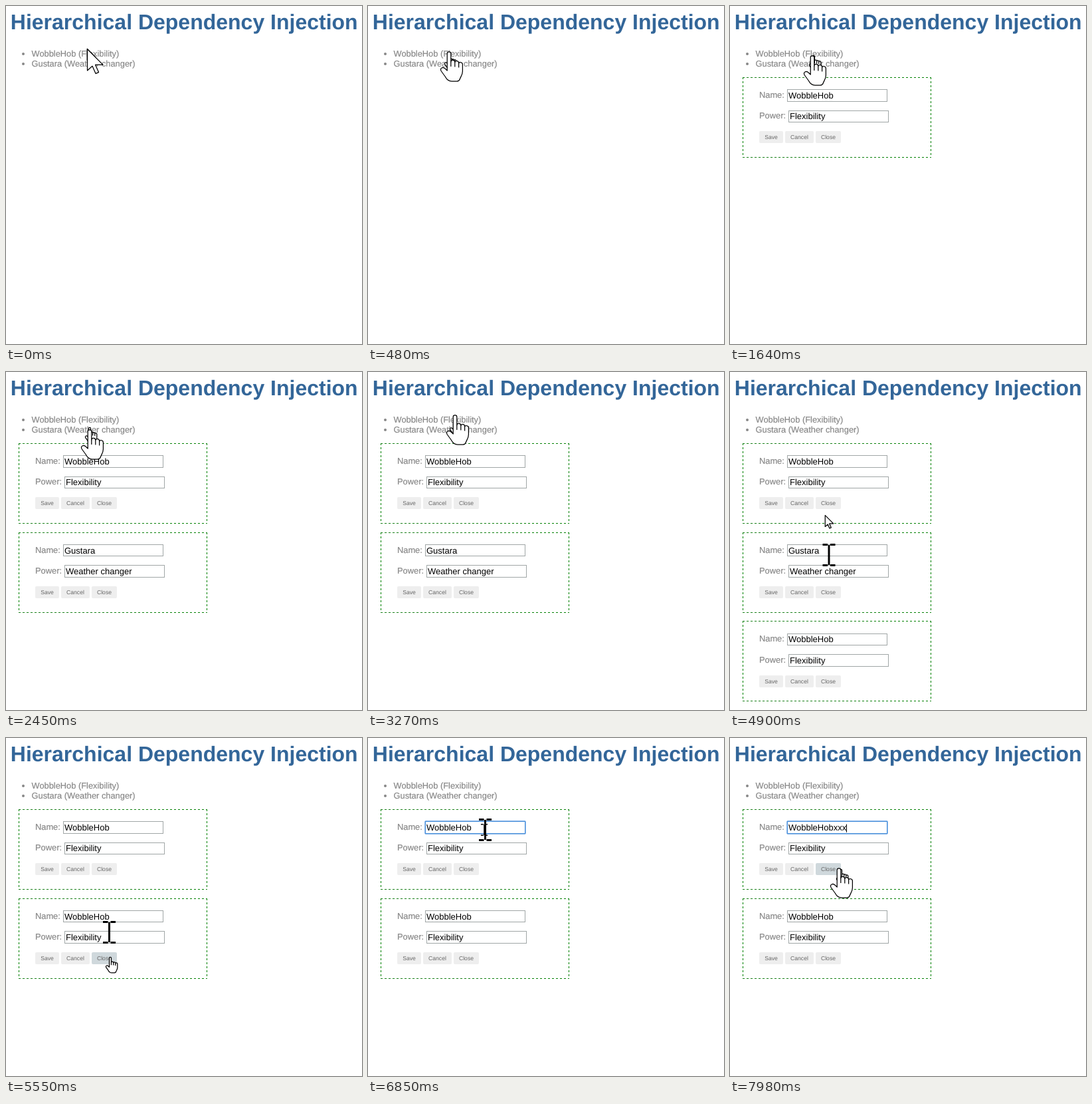
Recreate the animation shown at these times as an HTML page. Size 536x508 px, loop 8000 ms.

```html
<!DOCTYPE html>
<html lang="en">
<head>
<meta charset="utf-8">
<title>Hierarchical Dependency Injection</title>
<style>
html, body { margin: 0; width: 100%; height: 100%; overflow: hidden; background: #fff; }
svg { display: block; }
text {
  font: 12.85px "Liberation Sans", Arial, sans-serif; text-rendering: geometricPrecision;
  fill: #888; stroke: #888; stroke-width: .2px;
}
.title { font-size: 32px; font-weight: bold; fill: #369; stroke: none; }
.value { font-size: 13px; fill: #000; stroke: none; }
.label { font-size: 8.6px; fill: #666; stroke: none; text-anchor: middle; }
.box { fill: none; stroke: green; stroke-dasharray: 3 3; }
.field { fill: #fff; stroke: #a0a6a6; }
.focus { stroke: #4a90d9; }
.ring { fill: none; stroke: #8db9ec; }
.button { fill: #eee; }
.hover { fill: #cfd8dc; }
.outline { fill: #fff; stroke: #000; stroke-width: 1.25; stroke-linejoin: round; vector-effect: non-scaling-stroke; }
</style>
</head>
<body>
<svg width="536" height="508">
  <defs>
    <path id="arrow" class="outline" d="M.5 .8V33L8 26.3 13 37.6 17.5 35.6 12.6 24.4H24Z"/>
    <g id="hand">
      <path class="outline" d="M-2.8 29V3.5C-2.8 0 2.8 0 2.8 3.5V16C3 12.5 8.8 12.5 8.8 16.5C9.8 13.8 14.6 14 14.6 18C15.6 15.7 20.4 16.3 20.4 20V30C20.4 35 18 37.5 16.6 41C15.8 44 14 45 12 45H4C-.5 45-3.5 42.5-5.5 38.5L-12 29.5C-14 25-9 23-6 26Z"/>
      <path class="outline" d="M2.8 16V23M8.8 16.5V23.5M14.6 18V24.5"/>
    </g>
    <path id="beam" fill="none" stroke="#000" stroke-width="3"
      d="M-9.5-15.5H-2M2-15.5H9.5M0-15V15M-9.5 15.5H-2M2 15.5H9.5"/>
  </defs>
  <text class="title" x="6.8" y="35">Hierarchical Dependency Injection</text>
  <g fill="#888"><circle cx="26" cy="72" r="2"/><circle cx="26" cy="87" r="2"/></g>
  <text x="38.5" y="76">WobbleHob (Flexibility)</text>
  <text x="38.5" y="91">Gustara (Weather changer)</text>
  <g id="forms"></g>
  <g id="pointer"></g>
</svg>
<script>
const forms = document.getElementById('forms');
const pointer = document.getElementById('pointer');
const stretchy = ['WobbleHob', 'Flexibility'];
const stormy = ['Gustara', 'Weather changer'];
const pitch = 133.6;

// time, shape, x, y; an optional last pair places the small pointer
const path = [
  [0, 'arrow', 122, 64], [160, 'arrow', 122, 68], [320, 'hand', 122, 72], [480, 'hand', 122, 68],
  [1640, 'hand', 124, 74, 126, 74], [1800, 'hand', 125, 79], [1960, 'hand', 126, 83], [2120, 'hand', 126, 86],
  [2950, 'hand', 128, 80], [3110, 'hand', 130, 71], [3270, 'hand', 131, 64],
  [4260, 'hand', 131, 71], [4420, 'hand', 131, 98], [4580, 'arrow', 136, 150], [4740, 'arrow', 143, 215],
  [4900, 'beam', 149, 275], [5060, 'hand', 154, 318], [5220, 'hand', 157, 337],
  [5550, 'beam', 155.5, 292, 157, 329], [5710, 'arrow', 157, 245], [5870, 'hand', 158, 195],
  [6030, 'beam', 160, 165], [6190, 'beam', 161, 148], [6350, 'beam', 163, 138],
  [6850, 'beam', 176.5, 138, 175, 138], [7010, 'beam', 176.5, 136], [7340, 'beam', 178, 140],
  [7500, 'beam', 177, 158], [7660, 'arrow', 166, 180], [7820, 'hand', 167, 197], [7980, 'hand', 164, 195]
];

const text = (x, y, str, cls = '') => `<text class="${cls}" x="${x}" y="${Math.round(y)}">${str}</text>`;
const rect = (x, y, w, h, cls, rx = 0) =>
  `<rect class="${cls}" x="${x}" y="${y}" width="${w}" height="${h}" rx="${rx}"/>`;
const cursor = (shape, x, y, scale) =>
  `<use href="#${shape}" transform="translate(${x} ${y}) scale(${scale})"/>`;

// edges snap to whole pixels, so heights vary slightly between forms
function field(x, y, str, focus) {
  const top = Math.round(y), height = Math.round(y + 18.5) - top;
  return (focus ? rect(x - .5, top - .5, 152, height + 1, 'ring', 1.5) : '') +
    rect(x + .5, top + .5, 150, height - 1, focus ? 'field focus' : 'field') +
    text(x + 2, y + 13.6, str, 'value');
}

function button(x, y, w, str, hover) {
  const top = Math.round(y);
  return rect(x, top, w, 18, hover ? 'button hover' : 'button', 2) + text(x + w / 2, top + 12, str, 'label');
}

function form(row, [name, power], { focus, typed, hover } = {}) {
  const dy = row * pitch;
  const caret = typed ? typed + '<tspan dx="-1.5">|</tspan>' : '';
  return `<path class="box" transform="translate(19 ${Math.round(107.1 + dy)})"
      d="M0 .5H284M0 120.5H284M.5 0V121M283.5 0V121"/>` +
    text(44, 138.2 + dy, 'Name:') + field(86, 125.35 + dy, name + caret, focus) +
    text(44, 169.3 + dy, 'Power:') + field(88, 156.85 + dy, power) +
    button(44, 188.3 + dy, 36, 'Save') +
    button(83, 188.3 + dy, 43, 'Cancel') +
    button(129, 188.3 + dy, 38, 'Close', hover);
}

function draw(t) {
  const closed = t >= 5220;
  const typed = t >= 7340 ? 'xxx' : t >= 7010 ? 'xx' : '';
  forms.innerHTML =
    (t >= 980 ? form(0, stretchy, { focus: t >= 6350, typed, hover: t >= 7820 }) : '') +
    (t >= 2450 ? form(1, closed ? stretchy : stormy, { hover: t >= 5060 && t < 5710 }) : '') +
    (t >= 3600 && !closed ? form(2, stretchy) : '');

  const i = path.findLastIndex(key => key[0] <= t);
  const [, shape, x, y, sx, sy] = path[i];
  const last = path[Math.max(i - 1, 0)];
  pointer.innerHTML = cursor(last[1], sx ?? last[2], sy ?? last[3], .53) + cursor(shape, x, y, 1);
}

let drawn;
function tick(now) {
  const t = now % 8000;
  const step = Math.floor(t / 10);
  if (step !== drawn) draw(t);
  drawn = step;
  requestAnimationFrame(tick);
}
draw(0);
requestAnimationFrame(tick);
</script>
</body>
</html>
```
